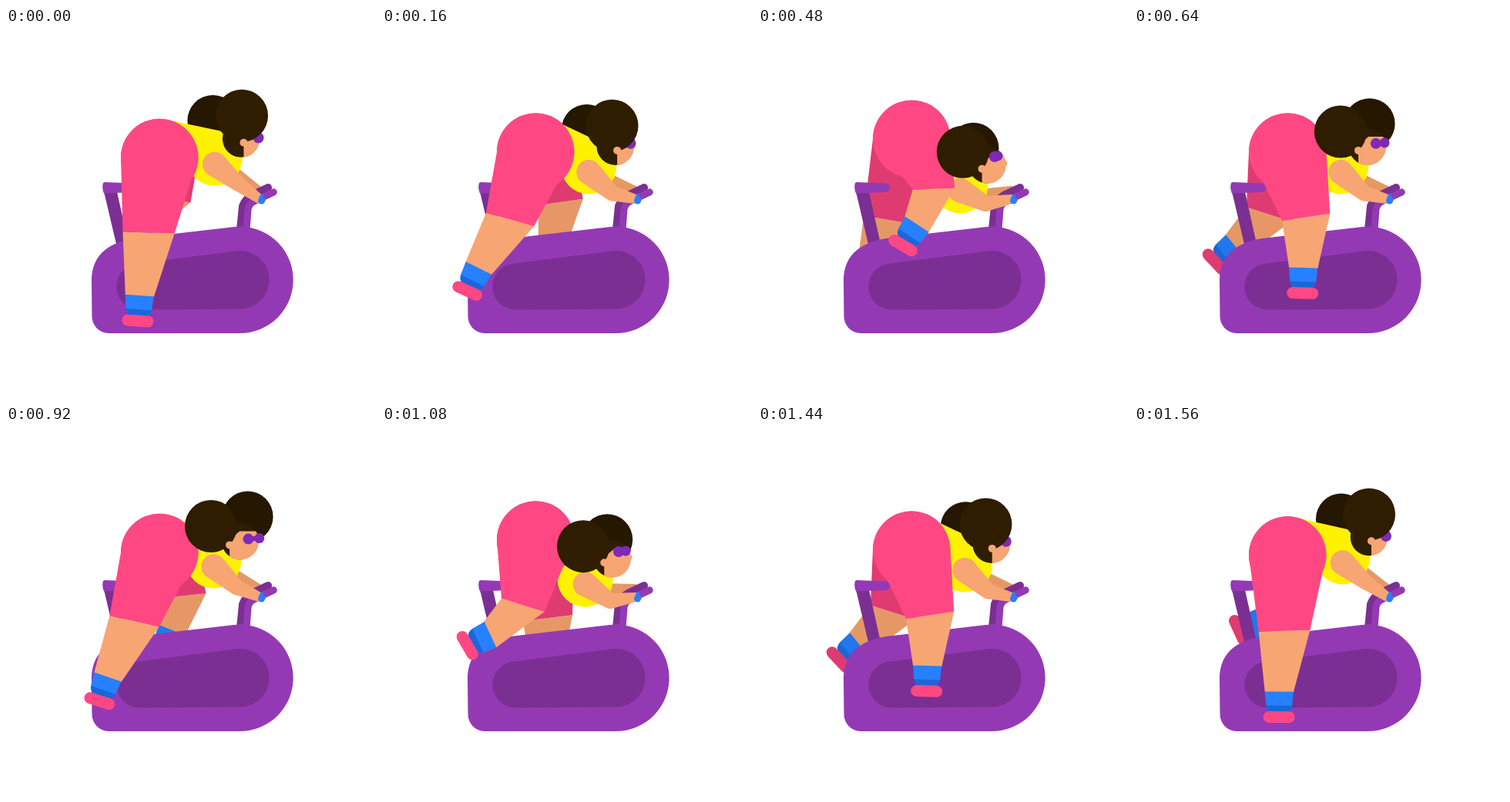
Recreate the animation shown at these times as an HTML page with a canvas. Size 480 px wide and 480 px high, loop 1600 ms.

```html
<!DOCTYPE html>
<html>
<head>
<meta charset="utf-8">
<style>
html, body { margin: 0; width: 100%; height: 100%; overflow: hidden; background: #fff; }
canvas { display: block; width: 480px; height: 480px; }
</style>
</head>
<body>
<canvas id="stage" width="480" height="480"></canvas>
<script>
const ctx = document.getElementById('stage').getContext('2d');
const { sin, cos, PI } = Math;
const LOOP = 1600, STEP = 40;
const PURPLE = '#9439b4', PLUM = '#7b2f92', LENS = '#7f29b8', YELLOW = '#fff200';
const SKIN = '#f7a573', SHADE = '#e59866', BLUE = '#2680ff', HAIR = '#2f1d00', HAIR_FAR = '#251700';
const NEAR = { shorts: '#ff4883', skin: SKIN, sock: BLUE, ankle: '#1d66d8' };
const FAR = { shorts: '#de3c70', skin: SHADE, sock: '#2277ec', ankle: '#1d66d8' };

function shape(color, d) {
  ctx.fillStyle = color;
  ctx.fill(new Path2D(d));
}
function line(color, width, d) {
  ctx.strokeStyle = color;
  ctx.lineWidth = width;
  ctx.lineCap = 'round';
  ctx.stroke(new Path2D(d));
}
function poly(color, ...points) {
  shape(color, 'M' + points.join('L') + 'Z');
}
function disc(color, x, y, r) {
  ctx.fillStyle = color;
  ctx.beginPath();
  ctx.arc(x, y, r, 0, 7);
  ctx.fill();
}
// Two circles joined by their outer tangents
function taper(color, x1, y1, r1, x2, y2, r2) {
  const dir = Math.atan2(y2 - y1, x2 - x1);
  const open = Math.acos((r1 - r2) / Math.hypot(x2 - x1, y2 - y1));
  ctx.fillStyle = color;
  ctx.beginPath();
  ctx.arc(x1, y1, r1, dir + open, dir - open);
  ctx.arc(x2, y2, r2, dir - open, dir + open);
  ctx.fill();
}

// The body rises and falls once per pedal turn: 0 is up close to the bars, 1 is leaning back
const bobAt = turn => .49 + .54 * cos(turn) - .05 * cos(2 * turn);
const hipAt = turn => 143 + 25.5 * bobAt(turn);

function leg(crank, offset, color) {
  const a = crank + offset, s = sin(a), c = cos(a), s2 = sin(2 * a);
  const hip = hipAt(crank), lift = .4 * (hip - hipAt(a));

  // The heel kicks up at the back of the stroke
  const kick = Math.exp(1.6 * (cos(a - 2.58) - 1));
  const rot = (78 * kick + 5 * s2) * PI / 180;
  const x = 162 + 9 * c - 56.8 * s;
  const y = 326.5 + 53.5 * c - s - 12 * kick ** 2;
  const at = (u, v) => [x + u * cos(rot) - v * sin(rot), y + u * sin(rot) + v * cos(rot)];

  const hemX = 199 - 14 * c - 30 * s;
  const hemY = 238.7 + 26.8 * c + 5 * s - 5.5 * s2 + lift;
  const halfX = 30 + 3.5 * c, halfY = 2.3 + 7 * s - c;
  const left = [hemX - halfX, hemY - halfY], right = [hemX + halfX, hemY + halfY];

  poly(color.skin, left, right, at(18.5, -32), at(-18.5, -32));
  ctx.save();
  ctx.translate(x, y);
  ctx.rotate(rot);
  shape(color.ankle, 'M-17-16H17Q16-6 8-6H-8Q-16-6-17-16Z');
  shape(color.sock, 'M-18.5-33H18.5L17-15H-17Z');
  ctx.rotate(-rot * .08);
  line(color.shorts, 15, 'M-13 0H13');
  ctx.restore();
  poly(color.shorts, [149, hip], left, right, [249.5, hip]);
  disc(color.shorts, 199.3, hip, 50.3);
}

function bike() {
  line(PLUM, 10, 'M304 262L307 231Q310 222 319 217L340 207');
  line(PURPLE, 9, 'M312 262L314 235Q315 227 326 223L347 213');
  poly(PLUM, [126, 208], [143, 208], [159, 280], [143, 280]);
  shape(PURPLE, 'M128 200L166 201.5A5.8 5.8 0 0 1 166 213L127 214.5Q124 207 126 201Z');
  shape(PURPLE, 'M111 326Q112 282 166 273L296 258A69.2 69.2 0 1 1 303 396H133A22 22 0 0 1 111.500 374Z');
  shape(PLUM, 'M168 306L299 289.300A37.750 37.750 0 1 1 304 364.500L172 365.500A30 30 0 0 1 168 306Z');
}

function torso(bob, hip) {
  const x = 262 + 9 * bob, y = 206 - 38 * bob;
  disc(YELLOW, x, y, 36);
  poly(YELLOW, [204, hip - 50], [x + 6, y - 35.5], [x, y + 36], [220, hip]);
}

function nearArm(bob) {
  const elbowX = 295 + 5 * bob, elbowY = 228 - 28 * bob ** 2;
  taper(SKIN, 262 + 9 * bob, 212 - 36 * bob, 16, elbowX, elbowY, 10);
  taper(SKIN, elbowX, elbowY, 10, 329, 222, 6);
  line(BLUE, 9, 'M331.5 224L333.5 219.5');
  line(PURPLE, 9, 'M338 217L347 213');
}

// Two round buns swing to opposite sides as the head turns
function bun(color, bob, yaw, side, radius) {
  const x = 271 + 19 * bob - .13 * yaw, y = 160 - 44 * bob;
  disc(color, x + side * yaw, y + side * (1 - .22 * yaw), radius);
}

function head(bob, yaw) {
  const front = 321 + 8 * bob, chin = 203 - 36 * bob;
  const earX = front - 28 + .4 * yaw;
  const lensX = front - 13 + 7 * bob + .25 * yaw, lensY = chin - 35 + 10 * bob;
  const gap = Math.max(0, -yaw * .6);

  disc(HAIR, front - 24, chin - 24, 24);
  ctx.save();
  ctx.clip(new Path2D(`M${earX} ${chin + 5}V${chin - 26}L${earX + 13} ${chin - 37}H${front + 9}V${chin + 5}Z`));
  disc(SKIN, front - 24, chin - 24, 24.3);
  ctx.restore();
  disc(SKIN, front - 2, chin - 26, 4);
  line(LENS, 6, `M${lensX} ${lensY}l${gap} -1`);
  disc(LENS, lensX + gap, lensY - 1, 6.5);
  disc(LENS, lensX, lensY, 7);
  bun(HAIR, bob, yaw, 1, 34);
  disc(SKIN, earX, chin - 19, 5);
}

function draw(t) {
  const crank = 4 * PI * t / LOOP;
  const bob = bobAt(crank);
  const yaw = 22 * cos(2 * PI * (t - 35) / LOOP) - 3;
  ctx.clearRect(0, 0, 480, 480);
  bun(HAIR_FAR, bob, yaw, -1, 33);
  leg(crank, PI, FAR);
  taper(SHADE, 280 + 9 * bob, 222 - 37 * bob, 11, 328, 210, 5);
  torso(bob, hipAt(crank));
  bike();
  nearArm(bob);
  leg(crank, 0, NEAR);
  head(bob, yaw);
}

function tick() {
  draw(Math.floor(performance.now() % LOOP / STEP) * STEP);
  requestAnimationFrame(tick);
}
tick();
</script>
</body>
</html>
```
